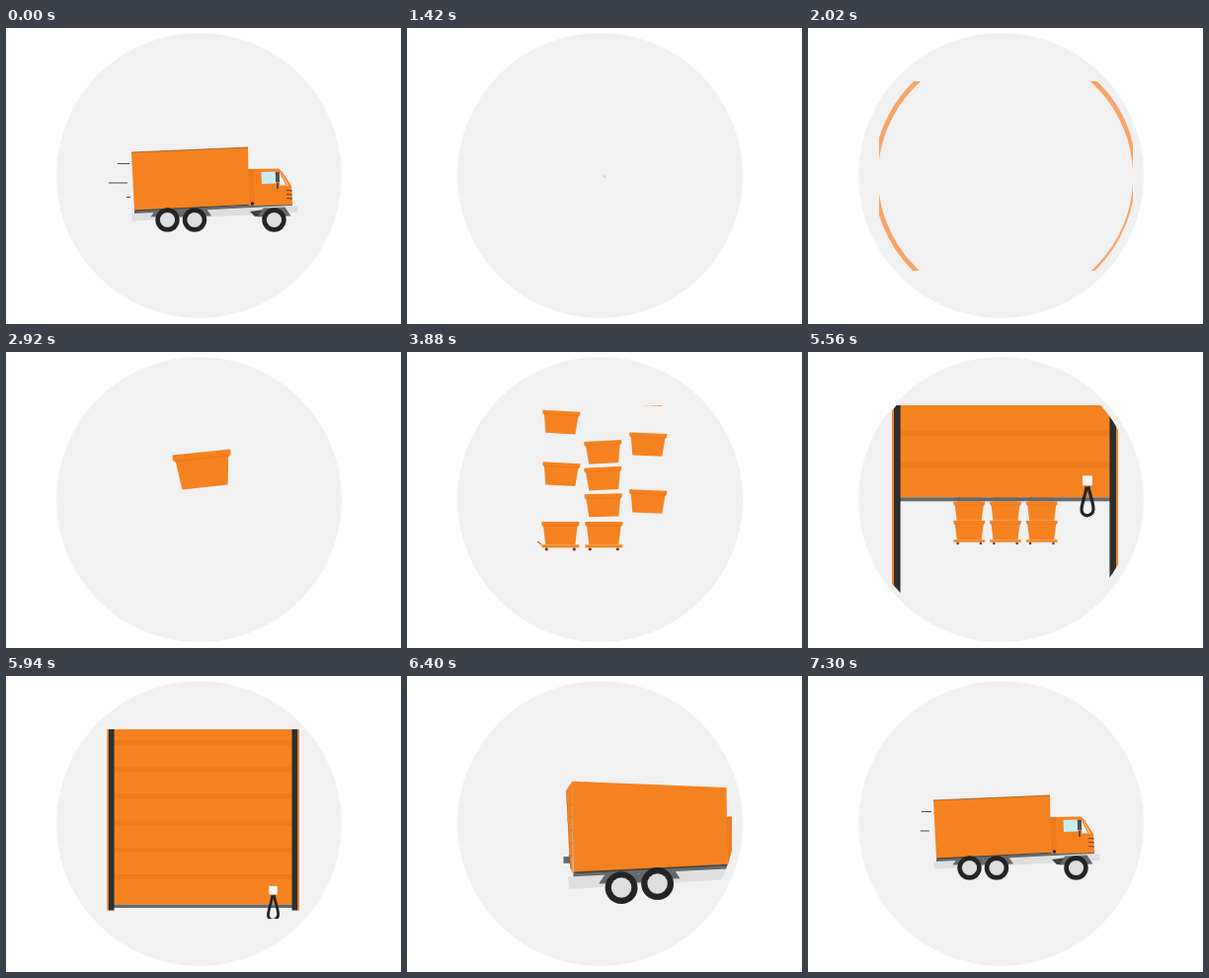
An HTML page with a canvas for the animation above (7340 ms loop, 400 px wide and 300 px high).

```html
<!DOCTYPE html>
<html lang="en">
<head>
<meta charset="utf-8">
<title>Moving truck</title>
<style>
  html, body { margin: 0; width: 100%; height: 100%; overflow: hidden; background: #fff; }
  canvas { display: block; width: 400px; height: 300px; }
</style>
</head>
<body>
<canvas id="stage" width="400" height="300"></canvas>
<script>
const ctx = document.getElementById('stage').getContext('2d');
const LOOP = 7340;
const ORANGE = '#f58220', SHADE = '#ed7a1c', DARK = '#2b2f30', GREY = '#67696a', PALE = '#dedede';

// Progress from 0 to 1 between two times
const ramp = (t, from, to) => Math.min(1, Math.max(0, (t - from) / (to - from)));
const mix = (a, b, p) => a + (b - a) * p;
const overshoot = p => 1 + 2.7 * (p - 1) ** 3 + 1.7 * (p - 1) ** 2;

function poly(color, ...p) {
  ctx.fillStyle = color;
  ctx.beginPath();
  for (let i = 0; i < p.length; i += 2) ctx.lineTo(p[i], p[i + 1]);
  ctx.closePath();
  ctx.fill();
}

function rect(color, x, y, w, h) {
  ctx.fillStyle = color;
  ctx.fillRect(x, y, w, h);
}

function disc(color, x, y, r) {
  ctx.fillStyle = color;
  ctx.beginPath();
  ctx.arc(x, y, r, 0, 7);
  ctx.fill();
}

function line(color, width, x1, y1, x2, y2) {
  ctx.strokeStyle = color;
  ctx.lineWidth = width;
  ctx.beginPath();
  ctx.moveTo(x1, y1);
  ctx.lineTo(x2, y2);
  ctx.stroke();
}

function group(draw, x, y, scale = 1, turn = 0) {
  ctx.save();
  ctx.translate(x, y);
  ctx.rotate(turn * Math.PI / 180);
  ctx.scale(scale, scale);
  draw();
  ctx.restore();
}

// Bin with its origin at the middle of the bottom edge
function bin() {
  poly(ORANGE, -17.5, -20, 17.5, -20, 15, 0, -15, 0);
  rect(ORANGE, -19, -23, 38, 3.8);
  rect(SHADE, -18, -19.6, 36, 1.4);
}

function dolly() {
  rect(ORANGE, -19, 0.3, 38, 3);
  for (const x of [-14, 14]) disc('#7a3a1c', x, 4.8, 1.6);
}

function wheel(x, y) {
  disc('#222425', x, y, 12.2);
  disc(PALE, x, y, 7.6);
}

function fender(x, y) {
  poly(GREY, x - 17, y - 3, x - 11, y - 12, x + 11, y - 13, x + 17, y - 4);
}

function cab() {
  poly(ORANGE, 244, 143, 276, 142.5, 280, 146, 289, 160, 290, 179, 246, 180);
  poly(SHADE, 245, 143, 251, 143, 252, 179, 246, 179);
  poly('#c6ecee', 258.5, 146, 272.5, 145.5, 273.5, 157.5, 259, 158);
  poly('#e4f5f4', 276.5, 146, 279, 147, 286, 159.5, 277.5, 159.5);
  line(ORANGE, 1.4, 278, 147, 284, 159);
  rect('#4c5052', 273, 146, 4, 10);
  rect('#4c5052', 274, 157, 2, 6);
  for (let y = 165; y < 174; y += 4) line('#5c4636', 1.2, 284, y - 0.5, 290, y);
  disc('#222425', 249.5, 178, 1.7);
}

function backFace(x, y, width) {
  const left = x - width, drop = Math.min(7, width * 1.5), post = width * 0.035;
  poly(ORANGE, left, y + drop, x, y, x, 185, left + 3, 181);
  for (let i = 1; i < 6; i++) {
    const bar = mix(y + drop, 181, i / 6);
    rect(SHADE, left + 2, bar, width - 2, 2);
  }
  poly(DARK, left, y + drop, left + post, y + drop, left + post + 3, 182, left + 3, 182);
  rect(DARK, x - post, y + 1, post, 184 - y);
}

// bend pulls the trailer into perspective, rear is the width of its back face
function truck(bend, rear) {
  const x = 127 + 2.2 * bend, y = 126 - 9.6 * bend;
  const axles = [[163.5 + 2.6 * bend, 194.5 + 1.9 * bend], [191 + 2.2 * bend, 194.5 - 1.1 * bend], [271.5, 194.5]];
  poly(PALE, 127 - bend, 188, 295, 180.5, 295.5, 187, 128 - bend, 195.5 + 2 * bend);
  poly(GREY, 130, 184, 290, 178, 290, 180, 130, 188);
  poly('#3c3f40', 247, 186, 262, 184, 258, 191, 252, 191);
  for (const axle of axles) fender(...axle);
  cab();
  if (rear > 0.3) {
    rect(GREY, x - rear - 2, 173, 5, 5);
    backFace(x, y, rear);
  }
  poly(ORANGE, x, y, 245, 121, 246, 179, 130, 184.8);
  line(`rgba(138, 76, 28, ${1 - bend})`, 0.7, x, y, 245, 121);
  line('#45403c', 1.1, 131, 185, 246, 179.3);
  for (const axle of axles) wheel(...axle);
}

function drive(t) {
  if (t < 1400) t += LOOP;
  const q = 1 - ramp(t, 5960, 7300);
  const go = 0.24 * Math.max(0, t - 7400);
  const x = 127 - 90 * q ** 2 + 258 * q ** 3 + go;
  const y = 194.5 + 65.5 * q ** 3.3;
  const scale = 1 + 0.69 * q ** 2 + 0.91 * q ** 8;
  group(() => {
    ctx.translate(-127, -194.5);
    truck(Math.min(1, q * 1.6), 75 * q ** 7);
  }, x, y, scale);

  // Streaks grow, hold for a moment, then stretch as the truck sets off
  const clock = Math.min(t, LOOP) + 60 * ramp(t, 7400, 7460);
  const streaks = [[125, 137.5, 0.05, 7100], [123, 157, 0.25, 7264], [126, 171.5, 0.1, 7300]];
  for (const [end, row, rate, from] of streaks) {
    const length = rate * Math.max(0, clock - from);
    if (length) line('#4a4a4a', 1.1, end + go - length, row, end + go, row);
  }
}

function ripple(t) {
  const p = ramp(t, 1480, 2120);
  if (!p) return disc('#fbc3bd', 200, 150.5, 1.3);
  ctx.strokeStyle = '#f7a468';
  ctx.lineWidth = 1 + 8 * Math.sin(p * Math.PI);
  ctx.beginPath();
  ctx.arc(200, 150.5, 1.3 + 154 * p, 0, 7);
  ctx.stroke();
}

function loneBin(t) {
  const pop = overshoot(ramp(t, 2160, 2460));
  const hop = Math.sin(Math.PI * ramp(t, 2660, 3180));
  const land = ramp(t, 2940, 3260);
  const y = mix(150, 173, pop) + 22 * land - 36 * hop;
  group(bin, 200 + 1.5 * hop, y, mix(1.55, 1, land) * pop, -6 * hop);
}

function stacks(t) {
  const fit = ramp(t, 4480, 5300), speed = 0.132;
  const columns = [
    { x: -44, base: 3760, full: 4160, tilt: 3 },
    { x: 0, base: 3260, full: 3920, tilt: -3 },
    { x: 44, base: 4002, full: 4145, tilt: 2.4 }
  ];
  group(() => {
    for (const { x, base, full, tilt } of columns) {
      const slide = ramp(t, base - 100, base);
      if (slide) group(dolly, x + 30 * Math.sign(tilt) * (slide - 1), 0);
      const drop = 2 * speed * Math.max(0, base - t);
      const gap = speed * Math.max(0, full - t);
      for (let i = x || t >= base ? 0 : 1; i < 4; i++) {
        const lift = drop + gap * i ** 0.85;
        group(bin, x, -23 * i - lift, 1, tilt * Math.min(1, lift / 10));
      }
    }
  }, mix(199.3, 200, fit), mix(195, 190, fit), mix(1, 0.835, fit));
  if (t > 3800 && t < 3960) line('#d9652a', 1.2, 132, 192, 136, 195);
}

function strap(y) {
  ctx.strokeStyle = '#222425';
  ctx.lineWidth = 3.2;
  ctx.beginPath();
  ctx.moveTo(282, y - 11);
  ctx.bezierCurveTo(281, y + 2, 271, y + 17, 282.5, y + 18.5);
  ctx.bezierCurveTo(295, y + 17, 286, y + 2, 284, y - 11);
  ctx.stroke();
  rect('#f4f4f4', 278, y - 22, 10, 10);
}

function doorway(t) {
  const zoom = 1 + 0.3 * (1 - ramp(t, 4700, 5500)) ** 2 - 0.15 * ramp(t, 5640, 5940);
  const bottom = Math.min(246, 30 + 0.325 * (t - 5200));
  group(() => {
    ctx.translate(-200, -150);
    if (bottom > 37) {
      rect(ORANGE, 93, 37, 213, bottom - 37);
      for (let y = bottom - 36; y > 37; y -= 32) rect(SHADE, 93, y, 213, 6);
      rect(GREY, 93, bottom, 213, 4);
      strap(bottom);
    }
    for (const [edge, post] of [[85, 87], [311.8, 305.4]]) {
      rect(ORANGE, edge, 37, 2.2, 216);
      rect(DARK, post, 37, 6.6, 216);
    }
  }, 200, 150, zoom);
}

function clipView() {
  ctx.beginPath();
  ctx.rect(72, 54, 257, 192);
  ctx.clip();
  ctx.beginPath();
  ctx.arc(193, 147, 139, 0, 7);
  ctx.clip();
}

function draw(t) {
  ctx.clearRect(0, 0, 400, 300);
  disc('#f1f1f1', 195.5, 149.5, 144.5);
  ctx.save();
  clipView();
  if (t < 1100 || t >= 5960) drive(t);
  else if (t >= 1420 && t < 2140) ripple(t);
  else if (t >= 2160) {
    if (t < 3260) loneBin(t);
    if (t >= 3060) stacks(t);
    if (t >= 4700) doorway(t);
  }
  ctx.restore();
}

const start = performance.now();
function tick() {
  draw((performance.now() - start) % LOOP);
  requestAnimationFrame(tick);
}
tick();
</script>
</body>
</html>
```
